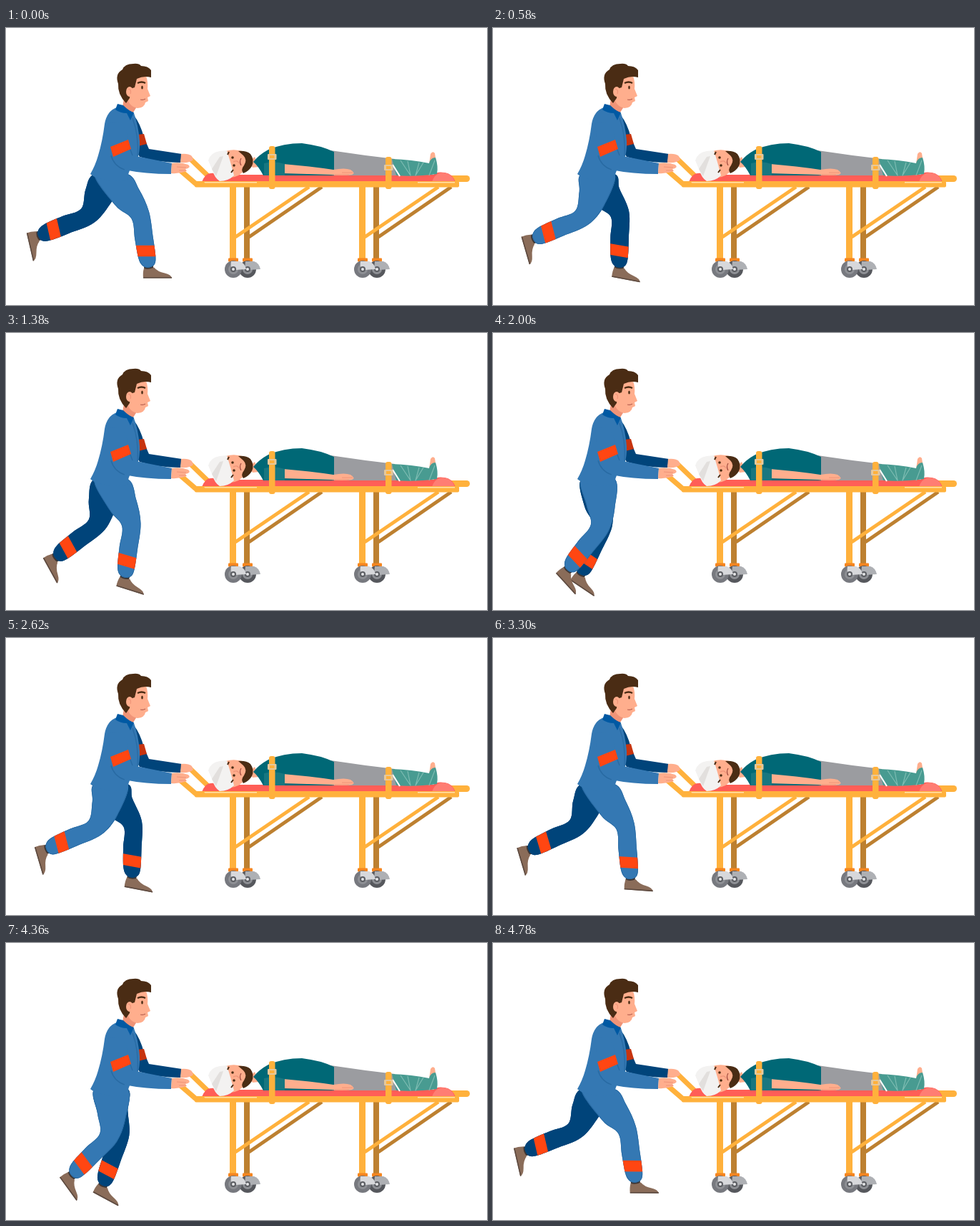
Write an HTML page with a canvas that moves like this. It is 673x387 px and loops after 4800 ms.

```html
<!DOCTYPE html>
<html lang="en">
<head>
<meta charset="utf-8">
<title>Stretcher</title>
<style>
  html, body { margin: 0; width: 100%; height: 100%; overflow: hidden; background: #fff; }
  canvas { display: block; width: 673px; height: 387px; }
</style>
</head>
<body>
<canvas id="stage" width="673" height="387"></canvas>
<script>
const ctx = document.getElementById('stage').getContext('2d');
const SWING = 1600;
const FAR_HIP = [144, 210], NEAR_HIP = [153, 212], THIGH = 60, SHIN = 71;
const C = {
  blue: '#3478b3', blueEdge: '#286aa3', navy: '#00447a', collar: '#0059a3',
  band: '#ff4612', bandDark: '#c7340f', skin: '#ffae8d', skinDark: '#ef9478',
  hair: '#4a2c14', shoe: '#8a6c59', sole: '#5c4a40', sock: '#3d3635',
  gold: '#ffb13c', goldDark: '#bd8030', amber: '#f5851f', red: '#ff5e57',
  teal: '#006876', sleeve: '#187780', cast: '#489b91', castLine: '#7dbcb2',
  grey: '#9b9ca0', white: '#fff'
};

function fill(color, d) {
  ctx.fillStyle = color;
  ctx.fill(new Path2D(d));
}

function line(color, width, d, cap = 'butt') {
  ctx.strokeStyle = color;
  ctx.lineWidth = width;
  ctx.lineCap = cap;
  ctx.lineJoin = 'round';
  ctx.stroke(new Path2D(d));
}

function disc(color, x, y, rx, ry = rx) {
  ctx.fillStyle = color;
  ctx.beginPath();
  ctx.ellipse(x, y, rx, ry, 0, 0, Math.PI * 2);
  ctx.fill();
}

function rect(color, x, y, w, h, r = 0) {
  ctx.fillStyle = color;
  ctx.beginPath();
  ctx.roundRect(x, y, w, h, r);
  ctx.fill();
}

// Closed smooth curve through all points.
function smooth(points) {
  const path = new Path2D(), n = points.length;
  const at = i => points[(i + n) % n];
  path.moveTo(...at(0));
  for (let i = 0; i < n; i++) {
    const [a, b, c, d] = [at(i - 1), at(i), at(i + 1), at(i + 2)];
    path.bezierCurveTo(
      b[0] + (c[0] - a[0]) / 6, b[1] + (c[1] - a[1]) / 6,
      c[0] - (d[0] - b[0]) / 6, c[1] - (d[1] - b[1]) / 6, ...c);
  }
  path.closePath();
  return path;
}

const rad = deg => deg * Math.PI / 180;

// Point reached from p: "along" a limb at the given angle and "out" to its front.
function step([x, y], angle, along, out = 0) {
  const s = Math.sin(rad(angle)), c = Math.cos(rad(angle));
  return [x + s * along + c * out, y + c * along - s * out];
}

function shoe([x, y], angle) {
  ctx.save();
  ctx.translate(x, y);
  ctx.rotate(rad(angle));
  fill(C.sock, 'M-7-4H6V9H-7Z');
  fill(C.shoe, 'M-7 4Q-2 7 7 3Q12 9 22 11Q31 13 32 18H-8Q-9 10-7 4Z');
  line(C.sole, 1.6, 'M-8 17.3H32');
  ctx.restore();
}

function leg(hip, color, edge, thigh, shin, foot) {
  const knee = step(hip, thigh, THIGH), ankle = step(knee, shin, SHIN);
  const bend = (thigh + shin) / 2;
  shoe(ankle, foot);
  const shape = smooth([
    [124, 204], [170, 204],
    step(hip, thigh, THIGH / 2, 20),
    step(knee, bend, 0, 14.5),
    step(knee, shin, 34, 13),
    step(knee, shin, 60, 11.5),
    step(ankle, shin, 0, 8),
    step(ankle, shin, 3, 0),
    step(ankle, shin, 0, -8),
    step(knee, shin, 60, -12.5),
    step(knee, shin, 32, -12.5),
    step(knee, bend, 0, -12),
    step(hip, thigh, THIGH / 2, -20)
  ]);
  ctx.fillStyle = color;
  ctx.fill(shape);
  ctx.save();
  ctx.clip(shape);
  ctx.strokeStyle = edge;
  ctx.lineWidth = 1.6;
  ctx.stroke(shape);
  ctx.translate(...step(knee, shin, 51));
  ctx.rotate(rad(11 - shin));
  rect(C.band, -20, -8, 40, 15.5);
  ctx.restore();
}

function drawLegs(t) {
  const p = (1 - Math.cos(t / SWING * Math.PI * 2)) / 2;
  const curve = (a, b, c = 0) => a + b * p + c * p * p;
  leg(FAR_HIP, C.navy, C.navy, curve(-31, 77), curve(-66, 95, -17), curve(77, -95, 18));
  leg(NEAR_HIP, C.blue, C.blueEdge, curve(34, -77), curve(11, -95, 4), curve(0, 104, -18));
}

function drawTrolley() {
  line(C.gold, 7, 'M257 182L283 207', 'round');
  rect(C.gold, 600, 206, 49, 9, 4.5);
  fill(C.red, 'M274 215Q279 203 286 203Q292 202 297 205H598Q603 200 614 202Q624 203 629 215Z');
  fill('#ff7d73', 'M596 215Q600 202 612 202Q624 203 628 215Z');
  for (const x of [0, 181]) {
    line(C.goldDark, 5, `M${x + 340} 292L${x + 442} 222`);
    rect(C.goldDark, x + 333, 221, 8, 104);
    line(C.gold, 5, `M${x + 321} 292L${x + 424} 222`);
    rect(C.gold, x + 313, 221, 9, 104);
    drawWheel(x + 338, '#56585d', '#aeb0b4');
    drawWheel(x + 318, '#77797f', '#d7d8db');
  }
}

function drawWheel(x, tyre, fork) {
  rect(C.amber, x - 7, 321.5, 14, 5, 1);
  disc(tyre, x, 337, 12);
  disc('#8e9095', x, 337, 7);
  fill(fork, `M${x - 3} 326H${x + 9}Q${x + 16} 328 ${x + 18} 337L${x + 3} 338Q${x - 5} 338 ${x - 3} 326Z`);
  disc('#5b5d62', x, 337, 4);
  disc('#e3e4e6', x, 337, 2);
}

function drawPatient() {
  // Neck, head and bandage
  fill(C.skin, 'M340 186L348 180L354 194L345 195Z');
  fill(C.skin, 'M307 172Q320 168 334 173Q341 184 334 198Q327 208 314 209Z');
  fill(C.hair, 'M325 172Q336 171 342 176Q348 184 344 193Q340 200 332 203Q328 198 333 192Q338 184 332 178Z');
  fill('#f3f2f1', 'M283 185Q286 174 299 172L309 171Q315 190 319 206Q311 214 299 214Q292 210 288 197Z');
  fill('#e2dfdd', 'M288 197L299 180L304 179L294 207Z');
  line(C.hair, 2, 'M310 177l2-4M315 202l3-4');
  disc(C.hair, 317, 181, 1.8);
  disc(C.hair, 319, 192, 1.8);
  line(C.skinDark, 1.3, 'M318 187Q324 184 326 189');
  line('#a34e42', 1.3, 'M329 182Q326 187 329 192');

  // Body and limbs
  fill(C.grey, 'M454 171Q500 178 544 183L550 206H454Z');
  fill(C.teal, 'M346 187Q354 177 367 170Q388 161 414 161Q440 164 459 173V206H360Q354 194 346 187Z');
  fill(C.skin, 'M388 190Q425 193 458 198Q474 195 482 198Q490 203 484 205Q470 207 455 205L388 203Z');
  line(C.skinDark, 1, 'M470 202H485M460 205H480');
  fill(C.sleeve, 'M361 189Q376 185 390 190V206H361Z');
  fill(C.skin, 'M592 190L594 176Q597 171 600 175L602 188Z');
  fill(C.cast, 'M540 183Q568 184 592 189Q594 181 601 181Q605 193 603 204Q572 208 546 206Z');
  line(C.castLine, 1.2, 'M552 185L566 206L562 186M584 188L573 206L578 188M600 185L592 206');
  line(C.white, 2, 'M541 191L551 207');
}

function drawRail() {
  rect(C.gold, 264, 214, 370, 8.5, 2);
  line('#ffe0aa', 1.5, 'M269 215.8H351M576 215.8H628');
  for (const [x, y] of [[368, 165], [531, 180]]) {
    rect(C.gold, x, y, 8.5, 225 - y, 3);
    rect('#e6c89b', x - 2, y + 11, 12.5, 8, 1);
    rect(C.gold, x + 1, y + 13, 6.5, 4);
  }
}

function drawUpperBody() {
  // Far arm
  fill(C.navy, 'M178 121Q188 133 193 153L200 169L246 176L244 188Q213 188 187 180L177 164Z');
  fill(C.bandDark, 'M183 149L193 148L197 162L185 165Z');
  fill(C.skin, 'M245 176Q255 175 260 179L262 184Q257 189 244 188Z');

  // Jacket
  fill(C.blue, 'M155 111Q141 116 138 134Q135 158 129 178Q125 192 118 204Q123 208 126 209Q150 216 171 212Q170 202 175 196Q188 185 187 158Q185 135 179 119Z');
  line(C.blueEdge, 1.2, 'M177 126Q186 150 184 179');
  fill(C.skinDark, 'M165 99L185 107L176 121L163 110Z');
  fill(C.collar, 'M156 106L164 108Q172 116 179 118L174 129L169 119Q160 119 153 114Z');

  // Near arm, gripping the handle
  line(C.gold, 7, 'M237 193L266 218H275', 'round');
  fill(C.blue, 'M143 133Q160 126 168 143L177 178L232 189L231 204Q195 204 165 198Q148 191 147 172Z');
  line(C.blueEdge, 1.3, 'M147 178Q151 193 166 198M169 157L177 178');
  fill(C.band, 'M146 166L171 156L175 169L150 180Z');
  fill(C.skin, 'M232 189Q244 187 255 191Q260 195 251 197L253 200Q242 204 231 203Z');
  line(C.skinDark, 1, 'M239 194L252 195M242 199L252 199');

  // Head
  fill(C.skin, 'M175 76Q183 65 196 67Q199 76 198 85L202 95L198 97L199 102L195 104Q194 111 184 112Q172 110 169 96Z');
  fill(C.hair, 'M157 78Q152 64 163 58Q166 50 178 50Q186 49 189 53Q199 53 203 59V69Q193 66 183 71L180 83L174 85L173 98L168 105Q156 93 157 78Z');
  disc(C.skin, 173, 89, 5, 7);
  line(C.skinDark, 1.2, 'M171 85Q176 86 174 92');
  line(C.hair, 2.4, 'M184 77Q190 74 195 77');
  disc(C.hair, 190.5, 83, 1.3, 2.5);
  line('#b75f50', 1.2, 'M188 100Q192 101 195 99');
}

function frame(now) {
  ctx.fillStyle = C.white;
  ctx.fillRect(0, 0, 673, 387);
  drawTrolley();
  drawPatient();
  drawRail();
  drawLegs(now % SWING);
  drawUpperBody();
  requestAnimationFrame(frame);
}

requestAnimationFrame(frame);
</script>
</body>
</html>
```
